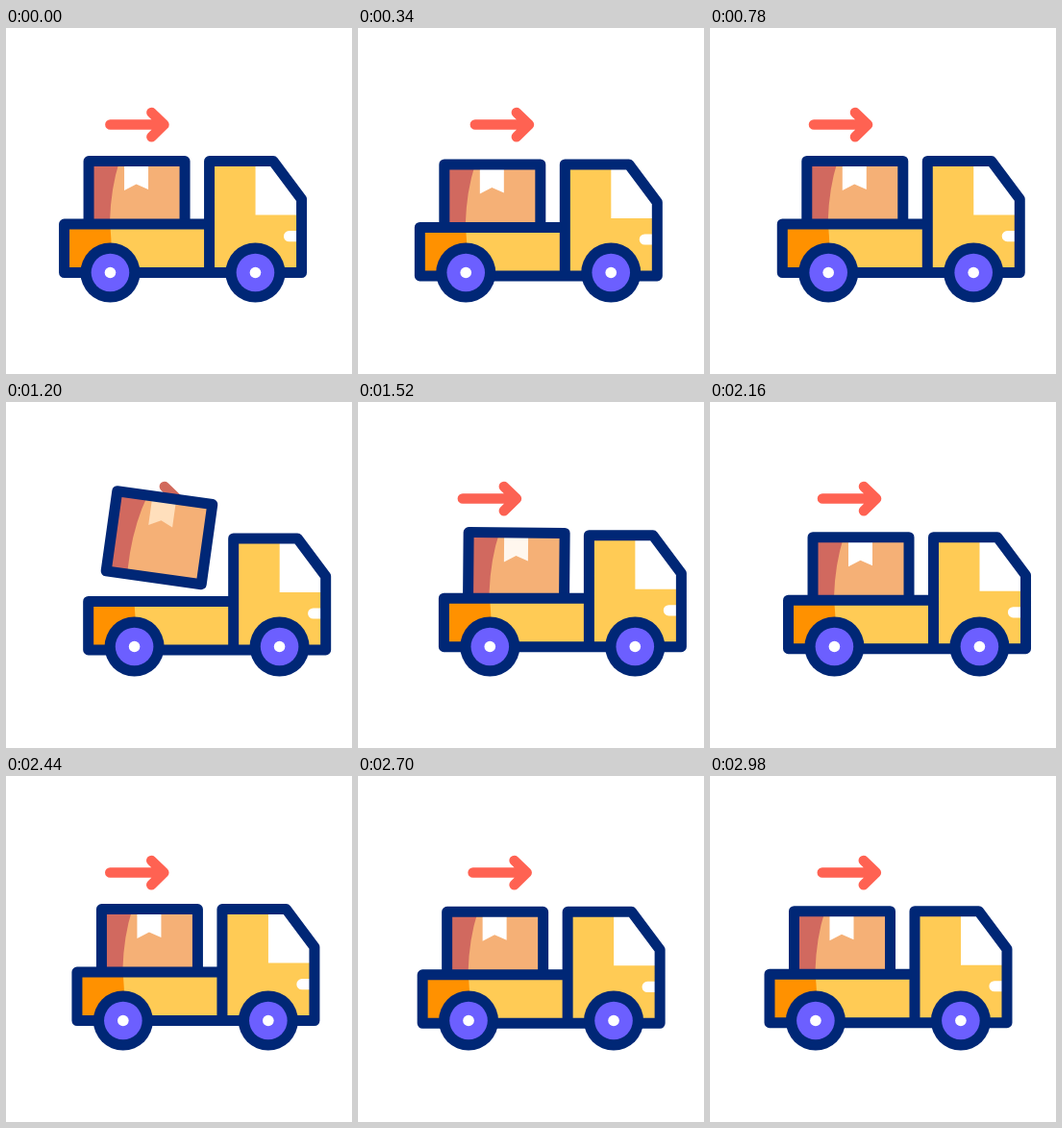
Animation of 360x360 px, one loop 3000 ms. Source, as an HTML page:

```html
<!DOCTYPE html>
<html lang="en">
<head>
<meta charset="utf-8">
<title>Delivery truck</title>
<style>
  html, body { margin: 0; width: 100%; height: 100%; overflow: hidden; background: #fff; }
  svg { display: block; width: 100vw; height: 100vh; }
  .line { fill: none; stroke: #002776; stroke-width: 11; stroke-linejoin: round; stroke-linecap: round; }
</style>
</head>
<body>
<svg viewBox="0 0 360 360">
  <defs>
    <g id="wheel">
      <circle r="31" fill="#002776"/>
      <circle r="19.8" fill="#6c5fff"/>
      <circle r="5.8" fill="#fff"/>
    </g>
  </defs>

  <path id="arrow" d="M108 100.5H163M151 88L164 100.5L151 113.3" fill="none"
        stroke-width="10.6" stroke-linejoin="round" stroke-linecap="round"/>

  <!-- parcel, drawn around its own centre -->
  <g id="parcel">
    <path d="M-50-42H50V42H-50Z" fill="#f5b076"/>
    <path d="M-50-42H-18Q-27-14-28 20V42H-50Z" fill="#d1695f"/>
    <path id="tape" d="M-13-42H12V-12.5L-.5-18L-13-11.5Z"/>
    <path class="line" d="M-50-42H50V42H-50Z"/>
  </g>

  <g id="body">
    <path d="M60.5 204H211.5V138.5H278L307.5 178V254.5H60.5Z" fill="#ffcb55"/>
    <path d="M60.5 204H108Q109 212 109.5 224V254.5H60.5Z" fill="#ff9100"/>
    <path d="M259.5 138.5H278L307.5 178V194.5H259.5Z" fill="#fff"/>
    <path d="M307 211H294.5A5.6 5.6 0 0 0 294.5 222.2H307Z" fill="#fff"/>
    <path class="line" d="M211.5 204H60.5V254.5H307.5V178L278 138.5H211.5V254.5"/>
  </g>

  <g id="wheels">
    <use href="#wheel" x="108.4" y="254.5"/>
    <use href="#wheel" x="259.4" y="254.5"/>
  </g>
</svg>
<script>
  const LOOP = 3000, BEAT = 816, LEAD = 45;
  const $ = id => document.getElementById(id);
  const move = (id, x, y, turn = 0) =>
    $(id).setAttribute('transform', `translate(${x} ${y}) rotate(${turn})`);
  // 0 to 1 and back over one turn
  const wave = turns => (1 - Math.cos(2 * Math.PI * turns)) / 2;
  const mix = (a, b, k) => `rgb(${a.map((v, i) => Math.round(v + (b[i] - v) * k))})`;

  function draw(ms) {
    const beat = (ms % LOOP + LEAD) / BEAT;
    const x = 29 * wave(beat / 4);
    const bounce = wave(beat);
    const y = 3.4 * bounce;
    const hop = Math.floor(beat) === 1 ? bounce : 0;  // the parcel jumps on the second beat

    move('wheels', x, 0);
    move('body', x, y);
    move('parcel', 136 + x - 1.7 * hop, 180.5 + y - 43 * hop, 8 * hop);
    move('arrow', 14 * bounce, 0);
    $('tape').setAttribute('fill', mix([255, 255, 255], [255, 223, 188], Math.min(1, hop * 4)));
    $('arrow').setAttribute('stroke', mix([255, 98, 82], [209, 105, 92], hop));
  }

  const start = performance.now();
  function tick() {
    draw(performance.now() - start);
    requestAnimationFrame(tick);
  }
  tick();
</script>
</body>
</html>
```
